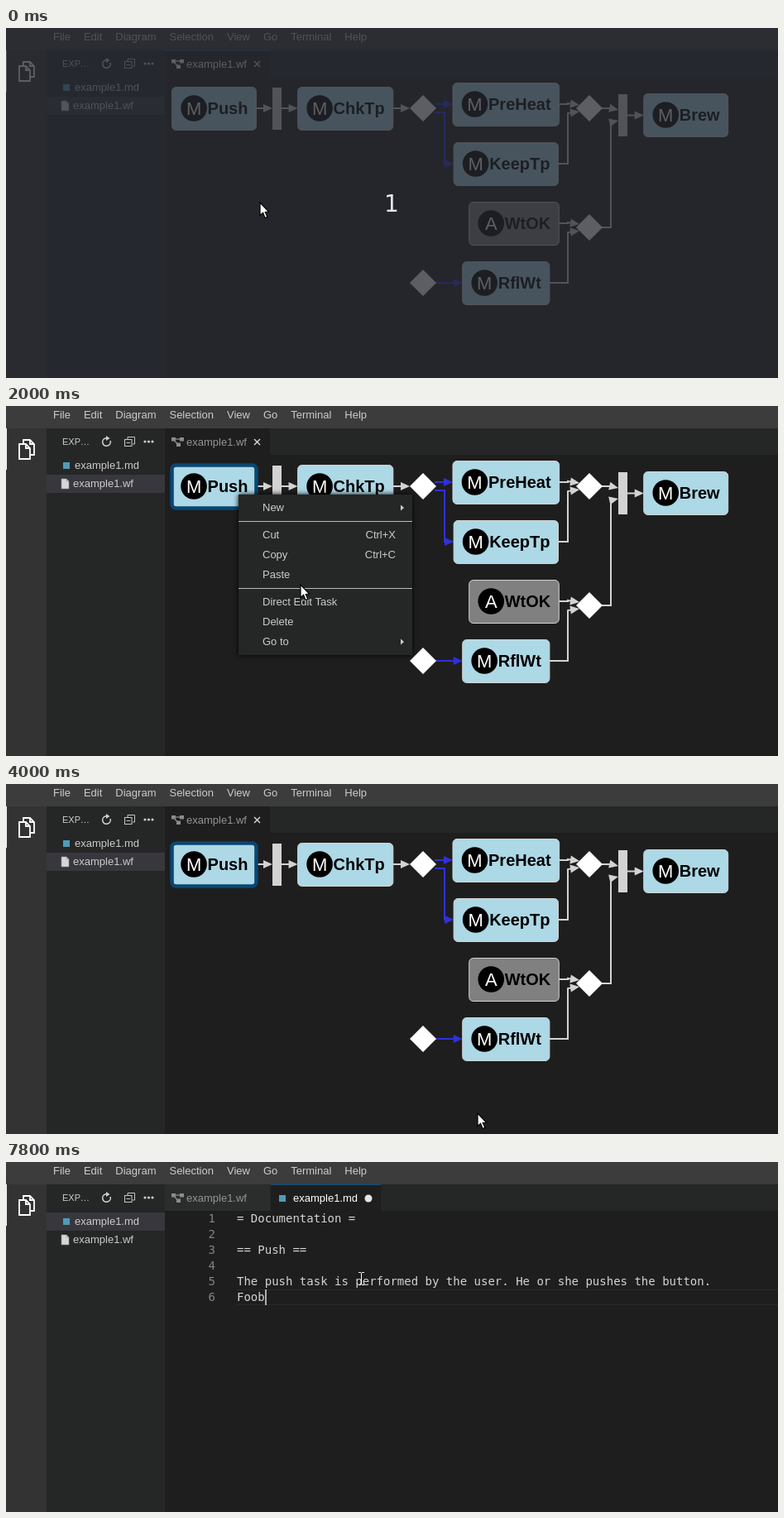
An HTML page with a canvas that plays this animation: 933 by 423 pixels, repeating every 8 s.

```html
<!DOCTYPE html>
<html lang="en">
<head>
<meta charset="utf-8">
<title>Workflow editor</title>
<style>
html, body { margin: 0; width: 100%; height: 100%; overflow: hidden; background: #1e1e1e; }
canvas { display: block; }
</style>
</head>
<body>
<canvas id="stage" width="933" height="423"></canvas>
<script>
const ctx = document.getElementById('stage').getContext('2d');
const SANS = '"Liberation Sans", Arial, sans-serif';
const UI = '13px ' + SANS;
const MONO = '14px "DejaVu Sans Mono", monospace';
const LABEL = 'bold 20px ' + SANS;
const CHAR = 8.428, LINE = 19, LEFT = 279, TOP = 59;
const GRAY = '#d3d3d3', BLUE = '#3030dc', ACCENT = '#094771', EDITOR = '#1e1e1e', PANEL = '#252626';
const LOOP = 8000, STEP = 200;

// Key points of the pointer: time, x, y
const POINTER = [
  [600, 307, 211], [1200, 280, 106], [1400, 280, 106], [2400, 397, 276], [3000, 560, 287],
  [3600, 570, 398], [4400, 570, 398], [5200, 449, 156], [5800, 434, 162], [6200, 429, 141]
];

const MENU = { x: 281, y: 107, w: 210, items: [
  ['New', '>'], null, ['Cut', 'Ctrl+X'], ['Copy', 'Ctrl+C'], ['Paste', ''], null,
  ['Direct Edit Task', ''], ['Delete', ''], ['Go to', '>']] };
const SUBMENU = { x: 488, y: 269, w: 225, items: [
  ['Next Marker', 'F8', true], ['Previous Marker', 'Shift+F8', true], null,
  ['Next node', 'Ctrl+4'], ['Previous node', 'Ctrl+3'], null, ['Documentation', '']] };
const DOCUMENT = ['= Documentation =', '', '== Push ==', '',
  'The push task is performed by the user. He or she pushes the button.'];

function widthOf(str, font) {
  ctx.font = font;
  return ctx.measureText(str).width;
}

// A task is as wide as its label plus room for the icon
function task(name, cx, y) {
  const w = widthOf(name, LABEL) + 53;
  return { name, y, w, left: cx - w / 2, right: cx + w / 2 };
}
const gate = (x, y) => ({ x, y });

const push = task('Push', 251.5, 97.5), check = task('ChkTp', 410.2, 97.5), brew = task('Brew', 821.7, 105.5);
const branch = ['PreHeat', 'KeepTp', 'WtOK', 'RflWt'].map((name, i) =>
  task(name, name === 'WtOK' ? 614 : 604.3, 92.5 + 72 * i));
const TASKS = [push, check, ...branch, brew];
const bars = [gate(327.5, 97.5), gate(745.5, 105.5)];
const forks = [gate(504, 97), gate(504, 308)];
const merges = [gate(705, 97), gate(705, 241)];

// Horizontal, then vertical at the bend, then on to the end; lead slants the last part
const route = (x0, y0, bend, x1, y1, lead = 0) => [x0, y0, bend, y0, bend, y1 + lead, x1, y1];
const flat = (x0, x1, y) => [x0, y, x1, y];
const EDGES = [
  flat(push.right, bars[0].x - 5.5, 97), flat(bars[0].x + 5.5, check.left, 97),
  flat(check.right, forks[0].x - 16, 97), flat(bars[1].x + 5.5, brew.left, 105.5),
  ...branch.map((b, i) => {
    const m = merges[i >> 1], side = i % 2 ? 1 : -1;
    return route(b.right, b.y - 0.5, 679, m.x - 12, m.y + 4 * side, 2 * side);
  }),
  ...merges.map((m, i) => {
    const side = i ? 1 : -1;
    return route(m.x + 15, m.y, 731, 740, 105.5 + 6.5 * side, 2 * side);
  })
];
const BLUE_EDGES = [[forks[0], branch[0], -5], [forks[0], branch[1], 5], [forks[1], branch[3], 0]]
  .map(([f, b, dy]) => route(f.x + 14, f.y + dy, 530, b.left, b.y - 0.5));

function pointerAt(t) {
  const i = POINTER.findIndex(p => p[0] > t);
  if (i === 0) return POINTER[0].slice(1);
  if (i < 0) return POINTER.at(-1).slice(1);
  const [t0, x0, y0] = POINTER[i - 1], [t1, x1, y1] = POINTER[i];
  const p = (t - t0) / (t1 - t0), ease = p * p * (3 - 2 * p);
  return [Math.round(x0 + (x1 - x0) * ease), Math.round(y0 + (y1 - y0) * ease)];
}

function box(x, y, w, h, fill) {
  ctx.fillStyle = fill;
  ctx.fillRect(x, y, w, h);
}

function text(str, x, y, fill = '#cccccc', font = UI, align = 'left') {
  ctx.font = font;
  ctx.textAlign = align;
  ctx.fillStyle = fill;
  ctx.fillText(str, x, y);
}

function trace(points, closed) {
  ctx.beginPath();
  for (let i = 0; i < points.length; i += 2) ctx.lineTo(points[i], points[i + 1]);
  if (closed) ctx.closePath();
}

function line(points, color, width = 1) {
  trace(points);
  ctx.strokeStyle = color;
  ctx.lineWidth = width;
  ctx.stroke();
}

function shape(points, fill, stroke, width = 1) {
  trace(points, true);
  paint(fill, stroke, width);
}

function paint(fill, stroke, width) {
  ctx.fillStyle = fill;
  ctx.fill();
  if (!stroke) return;
  ctx.strokeStyle = stroke;
  ctx.lineWidth = width;
  ctx.stroke();
}

function disc(x, y, r, fill) {
  ctx.beginPath();
  ctx.arc(x, y, r, 0, 7);
  paint(fill);
}

function roundBox(x, y, w, h, r, fill, stroke, width) {
  ctx.beginPath();
  ctx.roundRect(x, y, w, h, r);
  paint(fill, stroke, width);
}

function cross(x, y) {
  for (const d of [-3.5, 3.5]) line([x - 3.5, y - d, x + 3.5, y + d], '#e0e0e0', 1.3);
}

function flowIcon(x, y, color) {
  line([x + 2, y + 2, x + 12, y + 2], color, 1.3);
  line([x + 3, y + 3, x + 8, y + 9], color, 1.3);
  for (const [dx, dy] of [[0, 0], [10, 0], [6, 6.5]]) box(x + dx, y + dy, 5, 4.5, color);
}

function page(x, y, w, h, fold, fill, stroke, width) {
  const inner = x + w - fold;
  shape([x, y, inner, y, x + w, y + fold, x + w, y + h, x, y + h], fill, stroke, width);
  line([inner, y, inner, y + fold, x + w, y + fold], stroke, width);
}

function drawFrame(docOpen) {
  box(0, 0, 933, 423, EDITOR);
  box(0, 0, 933, 27, '#3c3c3c');
  box(0, 27, 49, 396, '#333333');
  box(49, 27, 143, 396, PANEL);
  box(192, 27, 741, 32, PANEL);
  let x = 57;
  for (const name of ['File', 'Edit', 'Diagram', 'Selection', 'View', 'Go', 'Terminal', 'Help']) {
    text(name, x, 15);
    x += widthOf(name, UI) + 16;
  }

  box(0, 27, 1, 50, '#ffffff');
  for (const d of [0, 5]) page(21 - d, 41 + d, 13, 18, 5, '#333333', '#ffffff', 1.8);

  text('EXP…', 68, 47, '#cccccc', '11px ' + SANS);
  ctx.beginPath();
  ctx.arc(121.5, 43.5, 4.8, -0.3, 4.9);
  ctx.strokeStyle = '#d0d0d0';
  ctx.lineWidth = 1.6;
  ctx.stroke();
  shape([121, 36, 125.5, 39, 121, 42], '#d0d0d0');
  line([147, 40, 147, 37.5, 155.5, 37.5, 155.5, 46, 153, 46], '#c5c5c5');
  ctx.strokeRect(143.5, 40.5, 8.5, 8);
  line([145.5, 44.5, 150, 44.5], '#c5c5c5');
  for (let i = 0; i < 3; i++) disc(168 + 4.5 * i, 43, 1.6, '#cccccc');

  box(49, docOpen ? 61 : 83, 143, 22, '#37373d');
  box(69, 68, 8, 8, '#519aba');
  text('example1.md', 83, 76);
  page(67, 88, 9, 12, 3, '#d4d7d6', '#909394', 0.6);
  text('example1.wf', 81, 98);
}

function drawTabs(docOpen, focused, dirty) {
  const bright = !docOpen && focused;
  const [x, w] = docOpen ? [320, 133] : [192, 127];
  if (docOpen) box(192, 27, 127, 32, '#2b2c2c');
  box(x, 27, w, 32, EDITOR);
  if (docOpen || focused) box(x, 27, w, 1, '#0a5286');
  flowIcon(200, 38, bright ? '#ffffff' : '#8c8c8c');
  text('example1.wf', 218, 48, bright ? '#ffffff' : '#949494');
  if (docOpen) {
    box(330, 40, 8, 8, '#519aba');
    text('example1.md', 347, 48, '#ffffff');
  }
  if (dirty) disc(438, 44, 4.5, '#e4e4e4');
  else cross(x + w - 15.5, 43.5);
}

function drawEdge(points, color) {
  const [px, py, x, y] = points.slice(-4);
  const a = Math.atan2(y - py, x - px);
  line([...points.slice(0, -2), x - 6 * Math.cos(a), y - 6 * Math.sin(a)], color, 2);
  ctx.save();
  ctx.translate(x, y);
  ctx.rotate(a);
  shape([0, 0, -11, -5, -11, 5], color);
  ctx.restore();
}

function drawDiagram(selected) {
  EDGES.forEach(e => drawEdge(e, GRAY));
  BLUE_EDGES.forEach(e => drawEdge(e, BLUE));
  for (const { x, y } of bars) box(x - 5.5, y - 25.5, 11, 51, GRAY);
  for (const { x, y } of [...forks, ...merges])
    shape([x - 16, y, x, y - 16, x + 16, y, x, y + 16], '#ffffff');
  for (const node of TASKS) {
    const { name, left, y, w } = node;
    const auto = name === 'WtOK', marked = selected && node === push;
    roundBox(left, y - 26, w, 52, 5, auto ? '#808080' : '#add8e6', marked ? ACCENT : GRAY, marked ? 4.5 : 1);
    disc(left + 26.5, y - 0.5, 15.8, '#000000');
    text(auto ? 'A' : 'M', left + 26.5, y + 7.5, '#ffffff', '22px ' + SANS, 'center');
    text(name, left + 43, y + 6.5, '#000000', LABEL);
  }
}

function drawMenu({ x, y, w, items }, px, py, active) {
  const rowHeight = item => item ? 24 : 9;
  const h = items.reduce((sum, item) => sum + rowHeight(item), 8);
  ctx.save();
  ctx.shadowColor = '#000000';
  ctx.shadowBlur = 6;
  box(x, y, w, h, PANEL);
  ctx.restore();
  let top = y + 4;
  for (const item of items) {
    const height = rowHeight(item), mid = top + height / 2;
    if (item) {
      const [label, key, disabled] = item;
      const hover = px >= x && px < x + w && py >= top && py < top + height;
      if (label === active || (hover && !active && !disabled)) box(x, top, w, height, ACCENT);
      const color = disabled ? '#666666' : '#cccccc';
      text(label, x + 29, mid + 4, color);
      if (key === '>') shape([x + 196, mid - 3.5, x + 200, mid, x + 196, mid + 3.5], color);
      else text(key, x + w - 20, mid + 4, color, UI, 'right');
    } else {
      box(x, mid - 0.5, w, 1, '#bbbbbb');
    }
    top += height;
  }
}

function drawDocument(t, typed) {
  const atEnd = t >= 5600;
  const mark = (row, col, fill) =>
    roundBox(LEFT + col * CHAR, TOP + row * LINE, 4 * CHAR, LINE, 3, fill);
  if (atEnd) {
    for (const y of [154, 172]) box(LEFT, y, 654, 1, '#2a2a2a');
  } else {
    mark(2, 3, '#264f78');
    if (t >= 4600) [4, 50].forEach(col => mark(4, col, '#343a40'));
  }
  [...DOCUMENT, typed].forEach((str, i) => {
    const y = TOP + 14 + i * LINE;
    text(i + 1, 253, y, '#858585', MONO, 'right');
    text(str, LEFT, y, '#d4d4d4', MONO);
  });
  if (t >= 6200 && t < 7000) return;
  const col = atEnd ? typed.length : 7, row = atEnd ? 5 : 2;
  box(Math.round(LEFT + col * CHAR), TOP + row * LINE, 2, LINE, '#aeafad');
}

function drawArrowPointer(x, y) {
  ctx.save();
  ctx.translate(x, y);
  shape([0, 0, 0, 15.5, 3.6, 12.3, 6, 18.5, 8.8, 17.3, 6.2, 11.4, 10.5, 11], '#ffffff', '#000000', 1.2);
  ctx.restore();
}

function drawBeam(x, y) {
  box(x, y - 7, 1, 14, '#ffffff');
  for (const dy of [-8, 7]) for (const dx of [-3, 1]) box(x + dx, y + dy, 3, 1, '#ffffff');
}

function draw(t) {
  const [px, py] = pointerAt(t);
  const typed = 'Foob'.slice(0, Math.max(0, Math.floor((t - 7400) / 133) + 1));
  const docOpen = t >= 4200;
  drawFrame(docOpen);
  drawTabs(docOpen, t < 1600, typed);
  if (docOpen) {
    drawDocument(t, typed);
    drawBeam(px, py);
    return;
  }
  drawDiagram(t >= 1200);
  if (t >= 1400 && t < 4000) {
    const subOpen = t >= 2400;
    drawMenu(MENU, px, py, subOpen && 'Go to');
    if (subOpen) drawMenu(SUBMENU, px, py);
  }
  if (t < 200) {
    box(0, 0, 933, 423, 'rgba(38, 41, 49, 0.75)');
    text('1', 466, 222, '#e6e6e6', '28px "DejaVu Sans", sans-serif', 'center');
  }
  drawArrowPointer(px, py);
}

function tick() {
  const t = performance.now() % LOOP;
  draw(Math.floor(t / STEP) * STEP);
  requestAnimationFrame(tick);
}
tick();
</script>
</body>
</html>
```
